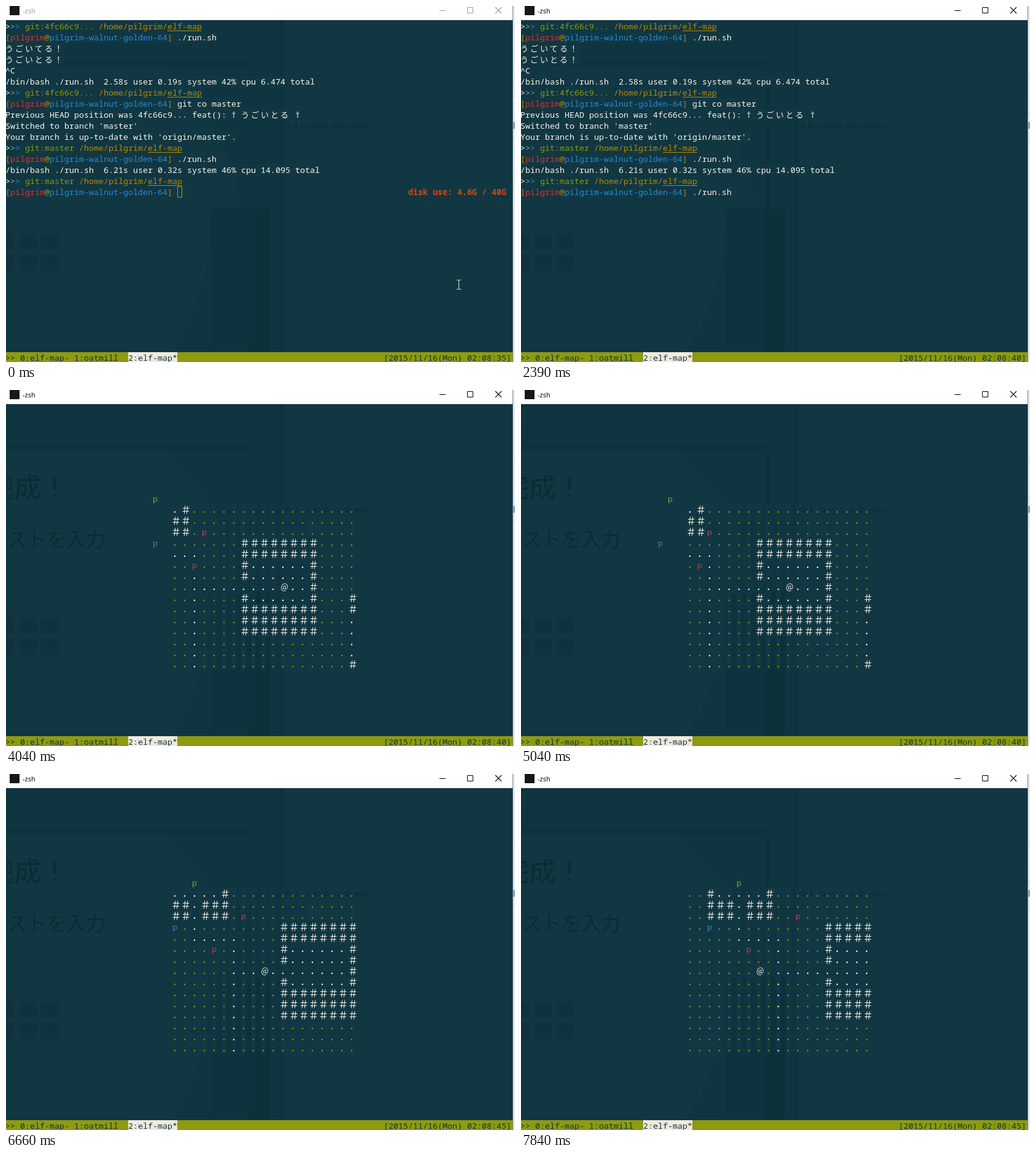
Recreate the animation shown at these times as an HTML page with a canvas. Size 829 by 580 pixels, loop 8 s.

```html
<!DOCTYPE html>
<html lang="en">
<head>
<meta charset="utf-8">
<title>Terminal</title>
<style>
  html, body { margin: 0; width: 100%; height: 100%; overflow: hidden; background: #113742; }
  canvas { display: block; }
</style>
</head>
<body>
<canvas id="stage" width="829" height="580"></canvas>
<script>
const ctx = document.getElementById('stage').getContext('2d');
const LOOP = 8000, CELL = 8, LINE = 18;
const MONO = '13.333px "Noto Sans Mono", monospace';
const CJK = '"Noto Sans CJK JP", "Noto Sans CJK", sans-serif';
const C = {
  base: '#113742', left: '#0f3540', dark: '#0d333d', ghost: '#0a2b35', faint: '#0e333e',
  white: '#fbf6e8', grey: '#93a1a1', red: '#dc322f', orange: '#cb4b16', yellow: '#b58900',
  green: '#8a9c08', blue: '#268bd2', bar: '#8f9a10', cursor: '#a5a010'
};
const USER = 'pilgrim', HOST = 'pilgrim-walnut-golden-64', DIR = 'elf-map';

const colX = col => col * CELL - 1;
const rowY = row => 24 + row * LINE;

function box(x, y, w, h, color) {
  ctx.fillStyle = color;
  ctx.fillRect(x, y, w, h);
}

function label(text, x, y, font, color) {
  ctx.font = font;
  ctx.fillStyle = color;
  ctx.fillText(text, x, y);
}

// Writes text on the character grid and returns the next free column.
function put(col, row, text, color = C.white, bg = C.base, weight = '') {
  for (const ch of text) {
    const wide = ch > '\u3000', span = wide ? 2 : 1;
    if (bg) box(colX(col), rowY(row), span * CELL, LINE, bg);
    label(ch, colX(col), rowY(row) + 14, wide ? '13px ' + CJK : weight + MONO, color);
    col += span;
  }
  return col;
}

function pathLine(row, ref) {
  put(0, row, '>');
  put(1, row, '>', C.grey);
  put(2, row, '> ', C.blue);
  let col = put(4, row, `git:${ref} `, C.green);
  col = put(col, row, `/home/${USER}/`, C.yellow);
  put(col, row, DIR, C.yellow);
  box(colX(col), rowY(row) + 16, DIR.length * CELL, 1, C.yellow);
}

function prompt(row, command) {
  put(0, row, '[', C.yellow);
  put(1, row, USER, C.red);
  put(8, row, '@', C.yellow);
  put(9, row, HOST, C.blue);
  put(33, row, '] ', C.yellow);
  put(35, row, command);
}

function stroke(color, width, draw) {
  ctx.strokeStyle = color;
  ctx.lineWidth = width;
  ctx.beginPath();
  draw();
  ctx.stroke();
}

// The desktop shining faintly through the window.
function wallpaper() {
  box(0, 0, 829, 580, C.base);
  box(0, 23, 446, 541, C.left);
  box(446, 23, 7, 541, C.faint);
  ctx.fillStyle = '#113842';
  ctx.beginPath();
  ctx.moveTo(0, 97);
  ctx.lineTo(250, 97);
  ctx.bezierCurveTo(320, 150, 375, 240, 380, 330);
  ctx.lineTo(333, 330);
  ctx.bezierCurveTo(337, 430, 305, 515, 265, 564);
  ctx.lineTo(0, 564);
  ctx.fill();
  stroke(C.dark, 7, () => {
    ctx.moveTo(0, 94);
    ctx.lineTo(390, 94);
    ctx.quadraticCurveTo(402, 94, 402, 106);
    ctx.lineTo(402, 330);
  });
  box(333, 330, 64, 234, C.faint);
  box(397, 330, 33, 234, '#0b313b');
  box(0, 224, 362, 1, C.dark);
  box(361, 224, 1, 106, C.dark);
  label('完成！', -31, 175, '44px ' + CJK, C.ghost);
  label('ストを入力', 2, 255, '32px ' + CJK, C.ghost);
  for (const y of [371, 406]) {
    box(0, y, 14, 26, C.faint);
    box(22, y, 28, 26, C.faint);
    box(57, y, 29, 26, C.faint);
  }
  for (const y of [112, 159, 176, 214]) box(453, y, 59, 1, '#0f333e');
  box(455, 190, 8, 9, C.dark);
  label('0', 468, 199, 'bold 13px "Liberation Sans", sans-serif', C.ghost);
  label('commit comments', 479, 199, '13px "Open Sans", sans-serif', C.ghost);
}

function frame(active) {
  const ink = active ? '#000' : '#999';
  box(0, 0, 826, 23, '#fff');
  box(6, 0, 16, 15, '#151a17');
  label('-zsh', 27, 12, '11px "Open Sans", sans-serif', ink);
  box(706, 7, 10, 1, ink);
  stroke(ink, 1, () => ctx.rect(751.5, 2.5, 9, 9));
  stroke(ink, 1.1, () => {
    ctx.moveTo(797, 2); ctx.lineTo(807, 12);
    ctx.moveTo(807, 2); ctx.lineTo(797, 12);
  });
  box(825, 0, 1, 580, '#73858c');
  box(826, 0, 3, 580, '#e6edf1');
  for (const y of [112, 159, 176, 214]) box(826, y, 3, 1, '#c3ccd2');
  box(826, 189, 3, 11, '#86aac6');
}

function statusBar(t) {
  const ink = '#12343c';
  box(0, 564, 825, 16, C.bar);
  put(0, 30, `>> 0:${DIR}- 1:oatmill`, ink, null);
  box(199, 564, 80, 16, '#f1eadb');
  put(25, 30, `2:${DIR}*`, ink, null);
  const sec = t < 710 ? 35 : t < 5590 ? 40 : 45;
  put(77, 30, `[2015/11/16(Mon) 02:08:${sec}]`, ink, null);
}

function shell(t) {
  const hash = '4fc66c9...';
  pathLine(0, hash);
  prompt(1, './run.sh');
  put(0, 2, 'うごいてる！');
  put(0, 3, 'うごいとる！');
  put(0, 4, '^C');
  put(0, 5, '/bin/bash ./run.sh  2.58s user 0.19s system 42% cpu 6.474 total');
  pathLine(6, hash);
  prompt(7, 'git co master');
  put(0, 8, `Previous HEAD position was ${hash} feat(): † うごいとる †`);
  put(0, 9, "Switched to branch 'master'");
  put(0, 10, "Your branch is up-to-date with 'origin/master'.");
  pathLine(11, 'master');
  prompt(12, './run.sh');
  put(0, 13, '/bin/bash ./run.sh  6.21s user 0.32s system 46% cpu 14.095 total');
  pathLine(14, 'master');
  prompt(15, t < 1550 ? '' : './run.sh');
  if (t < 1990) put(82, 15, 'disk use: 4.6G / 40G', C.orange, C.base, 'bold ');

  const block = (col, row) => box(colX(col), rowY(row), CELL, LINE, C.cursor);
  if (t < 280) stroke(C.cursor, 1, () => ctx.rect(279.5, 294.5, 7, 17));
  else if (t < 1120) block(35, 15);
  else if (t >= 1550 && t < 1990) block(43, 15);
  else if (t >= 1990 && t < 2390) block(0, 16);
}

function mousePointer() {
  stroke('#e8eeee', 1, () => {
    ctx.moveTo(737.5, 447); ctx.lineTo(737.5, 461);
    for (const y of [446.5, 461.5]) {
      ctx.moveTo(734, y); ctx.lineTo(737, y);
      ctx.moveTo(738, y); ctx.lineTo(741, y);
    }
  });
}

// time, player column on screen, map scroll
const views = [
  [4040, 11, 0], [4910, 10, 0], [5440, 9, 0], [5840, 9, 1], [6090, 9, 2], [6360, 9, 3],
  [6660, 9, 4], [6940, 9, 5], [7210, 9, 6], [7450, 9, 7], [7570, 8, 7], [7720, 7, 7]
];
// time, screen column of each monster
const packs = [
  [4040, -2, 3, -2, 2], [5040, -2, 2, -3, 1], [5965, -1, 3, -2, 2], [6240, 0, 5, -1, 3],
  [6510, 1, 6, 0, 3], [6660, 2, 7, 0, 4], [7060, 3, 8, 1, 5], [7330, 4, 9, 2, 6],
  [7570, 5, 10, 3, 7], [7840, 5, 11, 2, 6]
];
const monsters = [[8, '#959b22'], [11, '#c23a72'], [12, '#2f8cc6'], [14, '#bd4147']];
const latest = (track, t) => track.findLast(key => key[0] <= t);
const within = (v, lo, hi) => v >= lo && v <= hi;

// '#' is a wall, '.' a lit floor, ' ' unlit ground.
function tile(x, row) {
  if (within(x, -5, 1) && row <= 11) {
    if (row === 9) return x === -5 || x === 1 ? '#' : '.';
    return x === -2 ? '.' : '#';
  }
  if (within(x, 7, 14) && within(row, 12, 20)) {
    if (row < 14 || row > 17 || x === 14) return '#';
    return x === 7 && row !== 16 ? '#' : '.';
  }
  if (x === 18 && row >= 17) return within(row, 19, 22) ? '.' : '#';
  if (x === -2 && row === 12) return '.';
  if (row === 13 && within(x, -2, 2)) return '.';
  if (x === 2 && row >= 13) return '.';
  if (row === 16 && within(x, 2, 6)) return '.';
  return ' ';
}

function game(t) {
  const [, player, scroll] = latest(views, t);
  const pack = latest(packs, t).slice(1);
  const draw = (k, row, ch, color, weight) => {
    const col = 34 + 2 * k, x = colX(col), y = rowY(row);
    box(x, y, ch > '\u3000' || ch === '#' ? 2 * CELL : CELL, LINE, C.base);
    if (ch === '#') label('＃', x - 2, y + 15, '16px ' + CJK, color);
    else put(col, row, ch, color, null, weight);
  };
  for (let row = 9; row <= 23; row++) {
    for (let k = 0; k <= 18; k++) {
      const kind = tile(k - scroll, row);
      if (kind === '#') draw(k, row, '#', C.white);
      else draw(k, row, '.', kind === '.' ? C.white : C.green, 'bold ');
    }
  }
  monsters.forEach(([row, color], i) => draw(pack[i], row, 'p', color));
  draw(player, 16, '＠', C.white);
}

function render() {
  const t = performance.now() % LOOP;
  wallpaper();
  if (t < 2920) shell(t);
  else if (t >= 4040) game(t);
  statusBar(t);
  frame(t >= 280);
  if (t < 560) mousePointer();
  requestAnimationFrame(render);
}
render();
</script>
</body>
</html>
```
